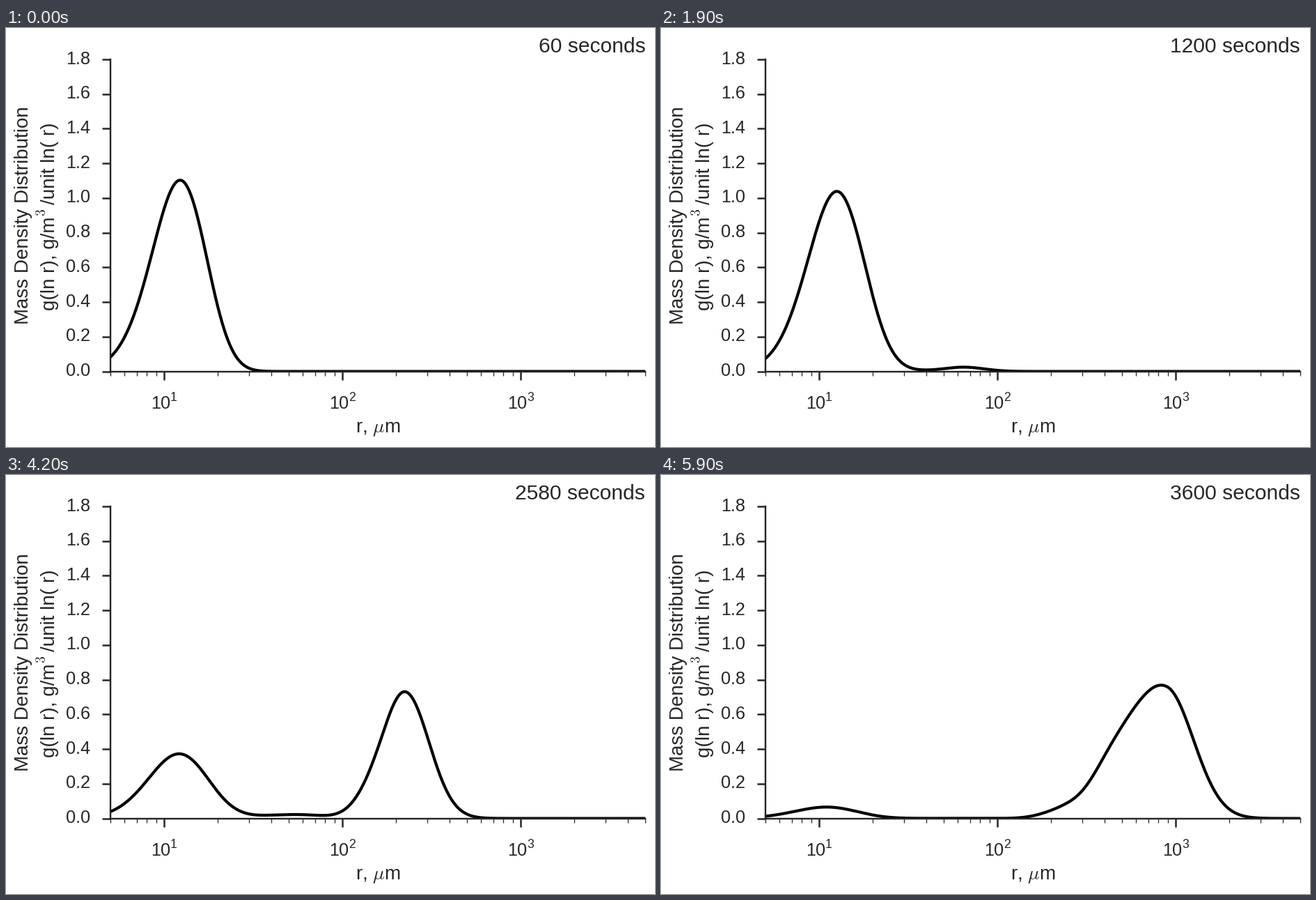
Write a matplotlib script that moves like this. It is 932x601 px and loops after 6 s.

```python
import numpy as np
import matplotlib.pyplot as plt
from matplotlib.animation import FuncAnimation

W, H, DPI = 932, 601, 128
PT = 72 / DPI  # points per pixel
LEFT, RIGHT, TOP, BOTTOM = 150.2, 918.2, 45, 492.6
DECADE = (RIGHT - LEFT) / 3
INK = "0.15"
FRAMES, INTERVAL = 60, 100
STEP_SECONDS = 60

plt.rcParams["font.family"] = "Liberation Sans"
plt.rcParams["mathtext.fontset"] = "cm"

log_r = np.linspace(np.log10(5), np.log10(5000), 700)


def ease(t, start, length):
    u = np.clip((t - start) / length, 0, 1)
    return u * u * (3 - 2 * u)


def sigmoid(z):
    return 1 / (1 + np.exp(-z))


def gamma_mode(height, centre, curvature, p):
    """Skewed mode: p sets how much faster the right side falls."""
    v = p * (log_r - centre) * np.log(10)
    return height * np.exp(curvature / p**2 * (v + 1 - np.exp(v)))


def bell(height, centre, left, right):
    width = np.where(log_r < centre, left, right)
    return height * np.exp(-0.5 * ((log_r - centre) / width) ** 2)


def density(t):
    """Cloud droplets drain into a rain mode that drifts to larger radii."""
    age = t - 38.2
    cloud = sigmoid(-0.1 * age - 0.7 * np.tanh(age / 8))
    grow = max(0, t - 36) / 23
    late = ease(t, 46.5, 14.5)

    cloud_at = 1.089 + 0.0005 * t - 0.003 * max(0, t - 33)
    rain_at = 2.232 + 0.0207 * (t - 36) - 0.006 * max(0, 29.5 - t) + 0.257 * late
    shoulder_at = 1.989 + 0.029 * (t - 36)

    onset = sigmoid(0.24 * (t - 23))
    rain = 1.08 * (1 - cloud) * onset * (1 - 0.3 * ease(t, 40, 20))
    shoulder = 0.09 * ease(t, 28, 9) + 0.185 * late
    drizzle = 0.03 * np.exp(-(((t - 35) / 12) ** 2))

    return (
        gamma_mode(1.115 * cloud, cloud_at, 8 - 0.033 * t, max(0.5, 0.8 - 0.0115 * t))
        + bell(rain, rain_at, 0.105 + 0.079 * grow, 0.111 + 0.042 * ease(t, 34, 16))
        + bell(shoulder, shoulder_at, 0.09 + 0.053 * grow, 0.105 + 0.053 * grow)
        + bell(0.038 * grow**2, shoulder_at - 0.3, 0.11, 0.09)
        + bell(drizzle, 1.716, 0.195, 0.156)
    )


fig = plt.figure(figsize=(W / DPI, H / DPI), dpi=DPI, facecolor="white")
ax = fig.add_axes([LEFT / W, 1 - BOTTOM / H, (RIGHT - LEFT) / W, (BOTTOM - TOP) / H])


def put(x, y, text, size, ha="left", **kw):
    """Text with its baseline at a pixel position from the top left."""
    return fig.text(x / W, 1 - y / H, text, fontsize=size * PT, color=INK,
                    ha=ha, va="baseline", **kw)


# Axes
ax.set_xscale("log")
ax.set_xlim(5, 5000)
ax.set_ylim(0, 1.8)
ax.set_xticks([10, 100, 1000])
ax.set_xticks([m * 10**e for e in range(4) for m in range(2, 10)
               if 5 <= m * 10**e <= 5000], minor=True)
ax.set_yticks(np.arange(10) * 0.2)
ax.tick_params(which="both", direction="out", color=INK,
               labelleft=False, labelbottom=False)
ax.tick_params(which="major", length=11.7 * PT, width=2.5 * PT)
ax.tick_params(which="minor", length=5.8 * PT, width=1.26 * PT)
for side, spine in ax.spines.items():
    spine.set_visible(side in ("left", "bottom"))
    spine.set_color(INK)
    spine.set_linewidth(2.43 * PT)

# Tick labels
for n in range(10):
    y = BOTTOM - n * (BOTTOM - TOP) / 9
    put(121.1, y + 6.5, f"{0.2 * n:.1f}", 25.2, ha="right")
for power in (1, 2, 3):
    x = LEFT + (power - np.log10(5)) * DECADE
    put(x - 19.2, 546.5, "10", 25.2)
    put(x + 8.6, 535, str(power), 17.6)

# Axis labels
upright = dict(rotation=90, rotation_mode="anchor")
put((LEFT + RIGHT) / 2, 579.5, r"r, $\mu$m", 27.7, ha="center")
put(32, (TOP + BOTTOM) / 2, "Mass Density Distribution", 27.7, ha="center", **upright)
put(70, 405, "g(ln r), g/m", 27.7, **upright)
put(57, 270.5, "$3$", 19.4, **upright)
put(70, 135.5, "/unit ln( r)", 27.7, ha="right", **upright)

clock = put(RIGHT, 35.3, "", 30, ha="right")
(curve,) = ax.plot(10**log_r, density(0), color="black", lw=4.2 * PT)


def update(i):
    curve.set_ydata(density(i))
    clock.set_text(f"{STEP_SECONDS * (i + 1)} seconds")
    return curve, clock


anim = FuncAnimation(fig, update, frames=FRAMES, interval=INTERVAL,
                     repeat=True, repeat_delay=0, blit=False)
plt.show()
```
